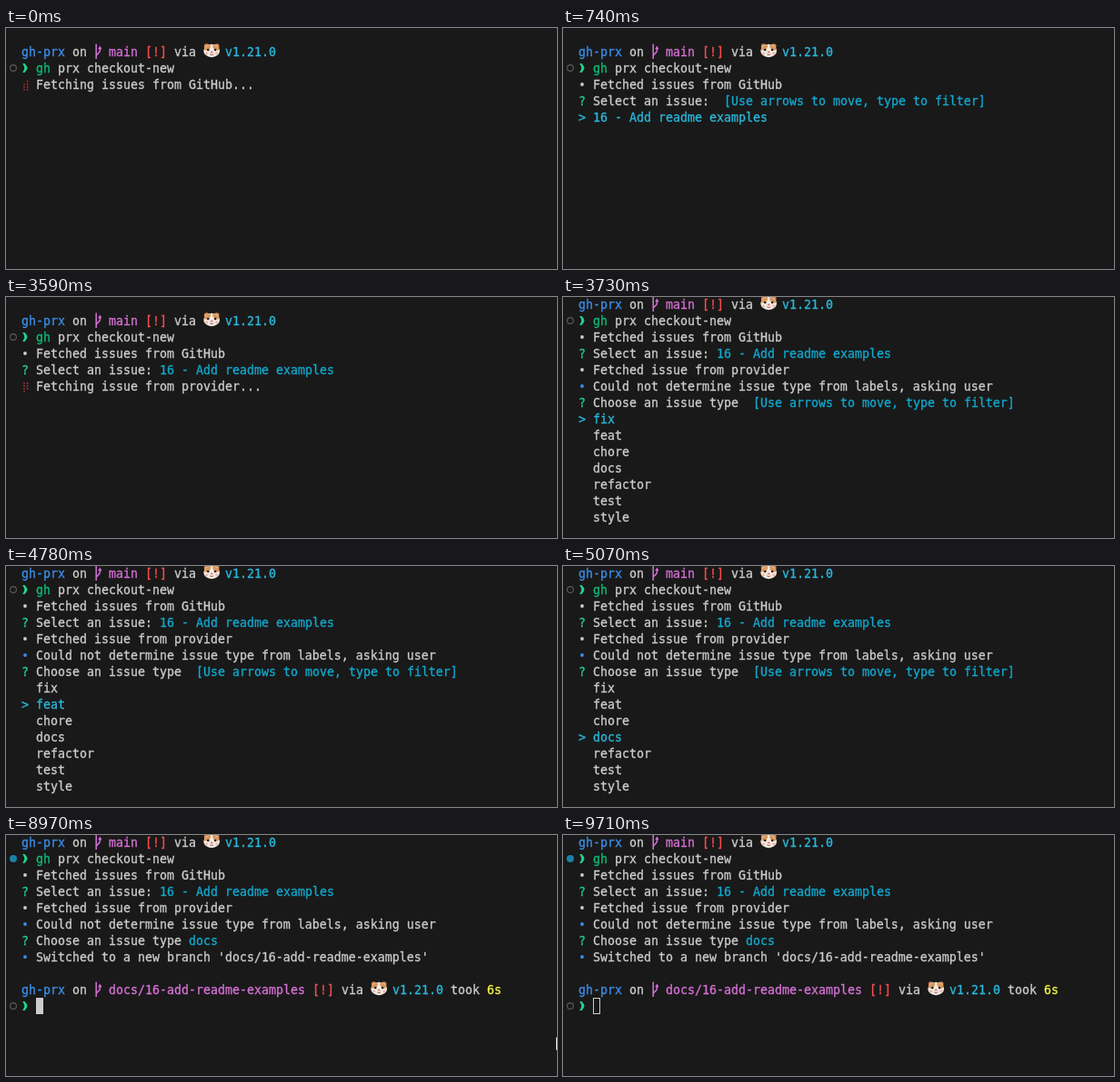
These frames come from a looping animation (606 by 265 pixels, 9730 ms). An HTML page:

```html
<!DOCTYPE html>
<html lang="en">
<head>
<meta charset="utf-8">
<title>Terminal session</title>
<style>
  html, body { margin: 0; width: 100%; height: 100%; overflow: hidden; background: #191919; }
  svg { display: block; }
  text { font: 13.29px "DejaVu Sans Mono", "Noto Sans Mono", monospace; white-space: pre; stroke-width: .3; }
</style>
</head>
<body>
<svg id="stage" width="606" height="265" viewBox="0 0 606 265">
  <defs>
    <g id="chevron">
      <path fill="#23d18b" d="M18.2-4.9h2.4Q23.5-1.8 23.5 0T20.6 4.9H18.2Q20.3 1.6 20.3 0T18.2-4.9Z"/>
    </g>
    <g id="branch" fill="none" stroke="#d670d6" stroke-width="1.5">
      <path d="M2.2-8.5V8M2.2 5Q2.4 3.2 4.4 1.8T6.4-1.5V-4"/>
      <path fill="#d670d6" stroke="none" d="M4.2-2.8 6.4-6.4 8.4-2.8Z"/>
    </g>
    <g id="hamster">
      <circle cx="3.6" cy="-6" r="2.8" fill="#d08a50"/>
      <circle cx="14.8" cy="-6" r="2.8" fill="#d08a50"/>
      <circle cx="3.8" cy="-5.8" r="1.4" fill="#e9a5a0"/>
      <circle cx="14.6" cy="-5.8" r="1.4" fill="#e9a5a0"/>
      <ellipse cx="9.2" cy="-1" rx="8.9" ry="7.2" fill="#f3ebe2"/>
      <path fill="#d9975a" d="M8.2-8Q2-6.9 .7-2 4.5-.6 6.8-3 8.6-5 8.2-8ZM10.2-8Q16.4-6.9 17.7-2 13.9-.6 11.6-3 9.8-5 10.2-8Z"/>
      <circle cx="5.3" cy="-2" r="1.3" fill="#2b1d1a"/>
      <circle cx="13.1" cy="-2" r="1.3" fill="#2b1d1a"/>
      <ellipse cx="9.2" cy=".5" rx="1.5" ry="1" fill="#e2777d"/>
      <path d="M7.3 2.9Q9.2 4.4 11.1 2.9" fill="none" stroke="#9a5a4c"/>
      <circle cx="3.6" cy="1.8" r="1.6" fill="#f0b9ae"/>
      <circle cx="14.8" cy="1.8" r="1.6" fill="#f0b9ae"/>
    </g>
    <path id="arrow" fill="#000" stroke="#f2f2f2" d="M.5 .8V14.2L3.6 11.4 5.6 16.3 7.9 15.3 5.9 10.5H10.2Z"/>
  </defs>
</svg>
<script>
const LOOP = 9730;
const LISTED = 740, PICKED = 3140, ASKED = 3730, DONE = 6270, BLUR = 9710;
const C = {
  fg: '#cccccc', blue: '#3b8eea', cyan: '#11a8cd', sky: '#29b8db', pink: '#d670d6',
  red: '#f14c4c', dim: '#cd3131', green: '#0dbc79', lime: '#23d18b', yellow: '#f5f543',
};
const HINT = '[Use arrows to move, type to filter]';
const ISSUE = '16 - Add readme examples';

const stage = document.getElementById('stage');
const timed = [];

function add(parent, tag, attrs, content = '') {
  const el = document.createElementNS('http://www.w3.org/2000/svg', tag);
  for (const key in attrs) el.setAttribute(key, attrs[key]);
  el.textContent = content;
  parent.append(el);
  return el;
}

// A group that is visible from one time to another
function span(from, to) {
  const el = add(stage, 'g', {});
  timed.push({ el, from, to });
  return el;
}

const colX = col => 17 + 8 * col;
const rowY = row => 8 + 18 * row;

// Parts are triples: column, colour, string
function write(g, row, ...parts) {
  for (let i = 0; i < parts.length; i += 3) {
    const [col, color, string] = parts.slice(i, i + 3);
    add(g, 'text', { x: colX(col), y: rowY(row) + 5, fill: color, stroke: color }, string);
  }
}

function icon(g, name, row, x) {
  add(g, 'use', { href: '#' + name, transform: `translate(${x} ${rowY(row)})` });
}

function bullet(g, row, color, string) {
  add(g, 'circle', { cx: 21, cy: rowY(row), r: 1.9, fill: color });
  write(g, row, 2, C.fg, string);
}

function question(g, row, string, ...rest) {
  write(g, row, 0, C.lime, '?', 2, C.fg, string, ...rest);
}

function prompt(g, row, name) {
  const end = 13 + name.length;
  write(g, row, 0, C.blue, 'gh-prx', 7, C.fg, 'on', 12, C.pink, name,
    end, C.red, '[!]', end + 4, C.fg, 'via', end + 11, C.sky, 'v1.21.0');
  icon(g, 'branch', row, 97);
  icon(g, 'hamster', row, colX(end + 8));
}

function marker(g, row, done) {
  add(g, 'circle', done
    ? { cx: 8, cy: rowY(row), r: 4, fill: '#1b81a8' }
    : { cx: 8, cy: rowY(row), r: 3.4, fill: 'none', stroke: '#5c5c5c', 'stroke-width': 1.1 });
  icon(g, 'chevron', row, 0);
}

function header(g, row, done) {
  prompt(g, row, 'main');
  marker(g, row + 1, done);
  write(g, row + 1, 2, C.green, 'gh', 5, C.fg, 'prx checkout-new');
}

// Eight dots running round the cell, one left out; steps are [time, gap]
function spinner(row, steps, end) {
  steps.forEach(([from, gap], i) => {
    const g = span(from, i + 1 < steps.length ? steps[i + 1][0] : end);
    for (let k = 0; k < 8; k++) {
      if (k === gap) continue;
      const line = k < 4 ? k : 7 - k;
      add(g, 'rect', {
        x: k < 4 ? 19.3 : 22.9, y: rowY(row) - 4 + 3 * line,
        width: 1.4, height: 1.6, fill: C.dim,
      });
    }
  });
}

// Fetching and picking an issue
header(span(0, ASKED), 1, false);

write(span(0, LISTED), 3, 2, C.fg, 'Fetching issues from GitHub...');
spinner(3, [[0, 0], [150, 2], [300, 3], [450, 4], [590, 6]], LISTED);

bullet(span(LISTED, ASKED), 3, C.fg, 'Fetched issues from GitHub');
const list = span(LISTED, PICKED);
question(list, 4, 'Select an issue:', 20, C.cyan, HINT);
write(list, 5, 0, C.sky, '> ' + ISSUE);

const picked = span(PICKED, ASKED);
question(picked, 4, 'Select an issue:', 19, C.cyan, ISSUE);
write(picked, 5, 2, C.fg, 'Fetching issue from provider...');
spinner(5, [[PICKED, 0], [3290, 1], [3440, 3], [3590, 4]], ASKED);

// Choosing the type, one row further up
header(span(ASKED, DONE), 0, false);
header(span(DONE, LOOP), 0, true);

const log = span(ASKED, LOOP);
bullet(log, 2, C.fg, 'Fetched issues from GitHub');
question(log, 3, 'Select an issue:', 19, C.cyan, ISSUE);
bullet(log, 4, C.fg, 'Fetched issue from provider');
bullet(log, 5, C.blue, 'Could not determine issue type from labels, asking user');
question(log, 6, 'Choose an issue type');
write(span(ASKED, DONE), 6, 24, C.cyan, HINT);

const types = ['fix', 'feat', 'chore', 'docs', 'refactor', 'test', 'style'];
[ASKED, 4780, 4920, 5070].forEach((from, chosen, times) => {
  const g = span(from, times[chosen + 1] ?? DONE);
  types.forEach((type, i) => {
    if (i === chosen) write(g, 7 + i, 0, C.sky, '> ' + type);
    else write(g, 7 + i, 2, C.fg, type);
  });
});

// Finished, new prompt
const done = span(DONE, LOOP);
write(done, 6, 23, C.cyan, 'docs');
bullet(done, 7, C.blue, "Switched to a new branch 'docs/16-add-readme-examples'");
prompt(done, 9, 'docs/16-add-readme-examples');
write(done, 9, 59, C.fg, 'took', 64, C.yellow, '6s');
marker(done, 10, false);

add(span(DONE, BLUR), 'rect', { x: 33, y: 179, width: 8, height: 18, fill: C.fg });
add(span(BLUR, LOOP), 'rect', { x: 33.5, y: 179.5, width: 7, height: 17, fill: 'none', stroke: C.fg });

// Mouse pointer crossing the corner
[[8970, 9110, 605, 222], [9110, 9260, 601, 232], [9260, 9400, 598, 245], [9400, 9550, 589, 260]]
  .forEach(([from, to, x, y]) => add(span(from, to), 'use', { href: '#arrow', x, y }));

function draw() {
  const t = performance.now() % LOOP;
  for (const { el, from, to } of timed) {
    el.style.display = t >= from && t < to ? '' : 'none';
  }
  requestAnimationFrame(draw);
}
draw();
</script>
</body>
</html>
```
